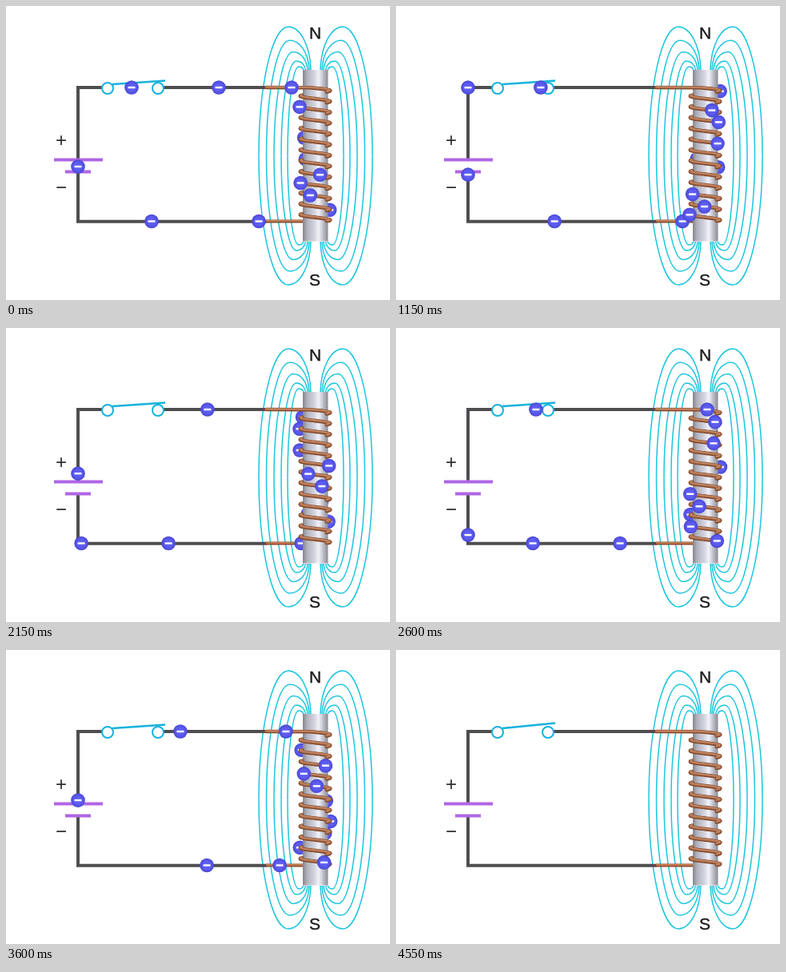
These frames come from a looping animation (480x368 px, 4600 ms). An HTML page:

```html
<!DOCTYPE html>
<html lang="en">
<head>
<meta charset="utf-8">
<title>Electromagnet circuit</title>
<style>
  html, body { margin: 0; width: 100%; height: 100%; overflow: hidden; background: #fff; }
  svg { display: block; width: 480px; height: 368px; }
  text { font-family: Arial, "Liberation Sans", sans-serif; text-anchor: middle; fill: #2b2b2d; }
  .pole { font-size: 21px; fill: #1c1c1e; stroke: #1c1c1e; stroke-width: .4; }
</style>
</head>
<body>
<svg viewBox="0 0 480 368">
  <defs>
    <linearGradient id="steel">
      <stop offset="0" stop-color="#85858d"/>
      <stop offset=".18" stop-color="#b4b4be"/>
      <stop offset=".45" stop-color="#d2d2de"/>
      <stop offset=".63" stop-color="#f2f2fa"/>
      <stop offset=".82" stop-color="#bbbbc5"/>
      <stop offset="1" stop-color="#8b8b94"/>
    </linearGradient>
    <radialGradient id="ball">
      <stop offset="0" stop-color="#6868f4"/>
      <stop offset=".7" stop-color="#5857ec"/>
      <stop offset="1" stop-color="#4745d0"/>
    </radialGradient>
    <g id="electron">
      <circle r="8.800" fill="url(#ball)"/>
      <path d="M-4.500 0H4.500" stroke="#fff" stroke-width="2.400"/>
    </g>
  </defs>
  <g id="field" fill="none" stroke="#1cc6de" stroke-width="1.500"></g>
  <g fill="none" stroke="#4f4d50" stroke-width="4">
    <path d="M90 192V102H120M90 208V269.700H326M197 102H326"/>
  </g>
  <g fill="none">
    <path d="M325 269.500H374" stroke="#8a4a2a" stroke-width="4"/>
    <path d="M325 269H374" stroke="#c07a50" stroke-width="1.800"/>
  </g>
  <g stroke="#b066e4" stroke-width="4">
    <path d="M60 192.500H121M74 207.500H106"/>
  </g>
  <text x="69" y="176" font-size="24">+</text>
  <text x="69" y="235" font-size="24">−</text>
  <g id="back"></g>
  <rect x="371" y="80" width="31.500" height="214.500" fill="url(#steel)"/>
  <g id="coil" fill="none" stroke-linecap="round"></g>
  <g fill="#fff" stroke="#16b2dc" stroke-width="2">
    <circle cx="127" cy="103" r="7"/>
    <circle cx="190" cy="103" r="7"/>
    <path id="arm" stroke-width="2.400"/>
  </g>
  <g id="front"></g>
  <text class="pole" x="386.500" y="41">N</text>
  <text class="pole" x="386" y="350">S</text>
</svg>
<script>
const $ = id => document.getElementById(id);
const NS = "http://www.w3.org/2000/svg";
function add(parent, tag, attrs) {
  const el = document.createElementNS(NS, tag);
  for (const k in attrs) el.setAttribute(k, attrs[k]);
  parent.append(el);
  return el;
}

const LOOP = 4600, STEP = 50, OFF = 4500;
const SPEED = 0.171, RAMP = 240;

// Route: coil from the bottom lead upwards, then the wire back round
const COIL = 1557, WIRE = 727, TRACK = COIL + WIRE;
const RATE = 0.0521, LEAD = 62.5, TURNS = 12, PITCH = 13.5;
const TOP = LEAD + TURNS * 2 * Math.PI / RATE;
const AXIS = 386.5, RADIUS = 19.5;
const EASE = 2 * (COIL - TOP - (AXIS + RADIUS - 370));
const starts = [1328, 1114, 982, 743, 569, 478, 340, 176, 38,
  -54, -188, -348, -514, -623, -714];

function helix(a, r = RADIUS) {
  return {
    x: AXIS + r * Math.cos(a),
    y: Math.min(269, 268 - PITCH * a / (2 * Math.PI)),
    front: Math.sin(a) > 0
  };
}

function place(p) {
  p = ((p % TRACK) + TRACK) % TRACK;
  if (p < TOP) return helix((p - LEAD) * RATE);
  if (p < COIL) {
    const d = p - TOP;
    const drop = d < EASE ? d * d / (2 * EASE) : d - EASE / 2;
    return { x: AXIS + RADIUS - drop, y: 106 - 4 * Math.min(1, d / 25), front: true };
  }
  const u = p - COIL;
  if (u < 280) return { x: 370 - u, y: 102, front: true };
  if (u < 447) return { x: 90, y: 102 + u - 280, front: true };
  return { x: 90 + u - 447, y: 269.5, front: u < 715 };
}

function travel(t) {
  return SPEED * (t < RAMP ? t * t / (2 * RAMP) : t - RAMP / 2);
}

function drawField() {
  // peak x, peak y, widest x, foot x of each left-hand line
  const lines = [
    [353, 26, 316, 381], [355, 43, 325.5, 379], [359, 57.5, 335, 377],
    [363, 69, 344, 374.5], [366, 76, 352, 372]
  ], mid = 187.5, round = 0.55;
  for (const [px, py, ex, fx] of lines) {
    const shape = [
      [fx, 80],
      [fx - 1, 80 - (80 - py) * 0.6], [px + (fx - px) * 0.5, py], [px, py],
      [px - (px - ex) * round, py], [ex, mid - (mid - py) * round], [ex, mid]
    ];
    for (const side of [1, -1]) for (const end of [1, -1]) {
      const [first, ...rest] = shape.map(([x, y]) =>
        `${387 + side * (x - 387)} ${mid + end * (y - mid)}`);
      add($("field"), "path", { d: `M${first}C${rest.join(" ")}` });
    }
  }
}

function drawCoil() {
  const strokes = [["#7a4429", 4.6, 0], ["#ad6a45", 2.9, -0.3], ["#cf9877", 1, -0.8]];
  for (let k = 0; k <= TURNS; k++) {
    const pts = [];
    const end = k < TURNS ? Math.PI + 0.55 : 1.2;
    for (let a = -0.7; a <= end; a += 0.12) {
      const { x, y } = helix(k * 2 * Math.PI + a, 18.6);
      pts.push(x.toFixed(1) + " " + y.toFixed(1));
    }
    if (k === TURNS) pts.push("380 102.300", "325 102");
    for (const [stroke, width, dy] of strokes) {
      add($("coil"), "path", {
        d: "M" + pts.join("L"), stroke, "stroke-width": width,
        transform: `translate(0 ${dy})`
      });
    }
  }
}

const balls = starts.map(() => ["back", "front"].map(id =>
  add($(id), "use", { href: "#electron" })));

function render(t) {
  const on = t < OFF, moved = travel(t);
  $("arm").setAttribute("d", `M133 98L199 ${on ? 93.5 : 91.5}`);
  balls.forEach(([back, front], i) => {
    const { x, y, front: near } = place(starts[i] + moved);
    const at = `translate(${x.toFixed(2)} ${y.toFixed(2)})`;
    back.setAttribute("transform", at);
    front.setAttribute("transform", at);
    back.style.display = on && !near ? "" : "none";
    front.style.display = on && near ? "" : "none";
  });
}

drawField();
drawCoil();
render(0);
const begin = performance.now();
function tick() {
  const t = (performance.now() - begin) % LOOP;
  render(Math.floor(t / STEP) * STEP);
  requestAnimationFrame(tick);
}
requestAnimationFrame(tick);
</script>
</body>
</html>
```
